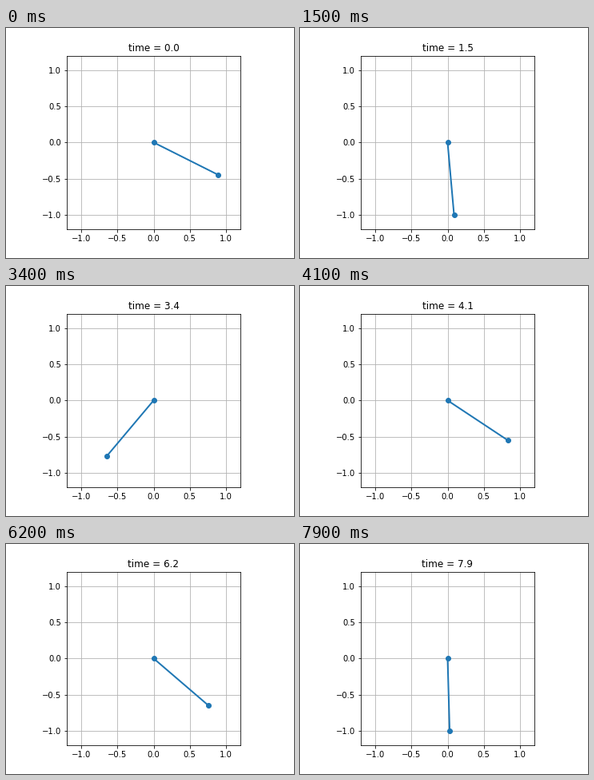
A matplotlib script for the animation above (8000 ms loop, 360x288 px).

```python
import numpy as np
import matplotlib.pyplot as plt
from matplotlib.animation import FuncAnimation

G, LENGTH, DAMPING = 9.8, 1.0, 0.1
START = (1.105, -1.75)  # angle from the vertical, angular velocity
FRAMES, DT, SUBSTEPS = 80, 0.1, 20


def deriv(state):
    theta, omega = state
    return np.array([omega, -G / LENGTH * np.sin(theta) - DAMPING * omega])


def rk4(state, h):
    k1 = deriv(state)
    k2 = deriv(state + h / 2 * k1)
    k3 = deriv(state + h / 2 * k2)
    k4 = deriv(state + h * k3)
    return state + h / 6 * (k1 + 2 * k2 + 2 * k3 + k4)


def swing():
    """Pendulum angle at every frame."""
    state = np.array(START)
    angles = []
    for _ in range(FRAMES):
        angles.append(state[0])
        for _ in range(SUBSTEPS):
            state = rk4(state, DT / SUBSTEPS)
    return np.array(angles)


theta = swing()

plt.rcParams["font.family"] = "DejaVu Sans"
fig, ax = plt.subplots(figsize=(5, 4), dpi=72)
fig.subplots_adjust(left=0.125, right=0.9, bottom=0.125, top=0.88)
ax.set_aspect("equal")
ax.set(xlim=(-1.2, 1.2), ylim=(-1.2, 1.2))
ticks = np.arange(-1, 1.1, 0.5)
ax.set_xticks(ticks)
ax.set_yticks(ticks)
ax.grid()

rod, = ax.plot([], [], "o-", lw=2)
title = ax.set_title("")


def update(i):
    x, y = LENGTH * np.sin(theta[i]), -LENGTH * np.cos(theta[i])
    rod.set_data([0, x], [0, y])
    title.set_text(f"time = {i * DT:.1f}")
    return rod, title


anim = FuncAnimation(fig, update, frames=FRAMES, interval=100,
                     repeat=True, repeat_delay=0)
plt.show()
```
